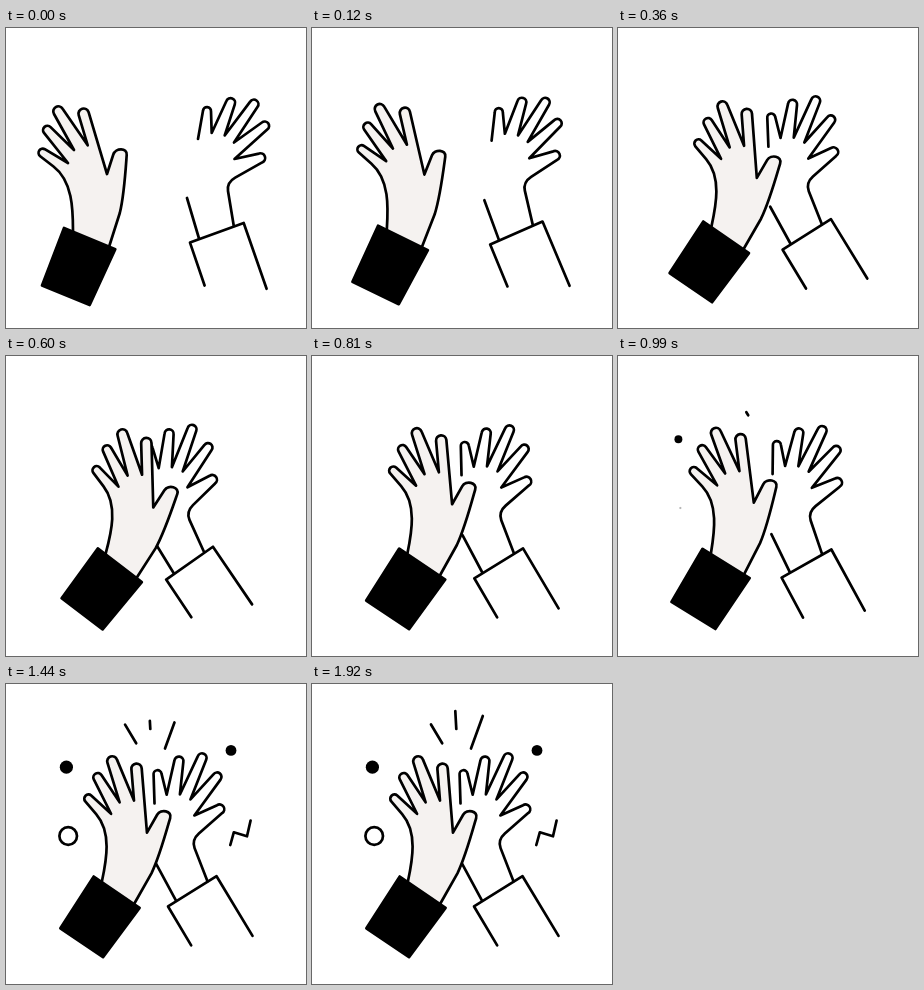
Animation, 300 px wide and 300 px high, one loop 2730 ms. Source, as an HTML page:

```html
<!DOCTYPE html>
<html lang="en">
<head>
<meta charset="utf-8">
<title>High five</title>
<style>
  html, body { margin: 0; width: 100%; height: 100%; overflow: hidden; background: #fff; }
  svg { display: block; width: 100%; height: 100%; }
</style>
</head>
<body>
<svg viewBox="0 0 300 300" fill="none" stroke="#000" stroke-width="2.7" stroke-linecap="round" stroke-linejoin="round">
  <g id="right">
    <path d="M192 111 L197 82.8 A4 4 0 0 1 205 83.3 L205.7 105
      L220.4 73 A4.5 4.5 0 0 1 228.8 76.3 L218.7 107.5
      L244.2 73.6 A4.5 4.5 0 0 1 251.6 78.8 L228 114.5
      L255.9 94.5 A4.4 4.4 0 0 1 261.5 101.3 L228.5 131
      L252.9 125.6 A4.7 4.7 0 0 1 256.2 134.4 L229.2 149.6
      C223.2 153 221.2 157.5 222 163 L227.8 198"/>
    <path d="M181 170 L193 210.5"/>
    <path d="M198.6 257.5 L184 214.6 L237.7 195 L260.6 260.8"/>
  </g>
  <g id="left">
    <path fill="#f5f2f0" d="M67 203 C67 181 66.5 153 47.5 138.5 L34.2 128.2
      A4.2 4.2 0 0 1 38.8 121.2 L62 135
      L38 104.9 A4.4 4.4 0 0 1 44.6 99.1 L68 122
      L48 86 A5 5 0 0 1 56.6 80.8 L81.7 117.3
      L72.7 87.2 A5.1 5.1 0 0 1 82.6 84.2 L101 146
      L107.3 126.5 C109.5 119.5 121.5 119.5 120.7 127
      C119 151 118 168 113.8 185 L103.3 218"/>
    <path fill="#000" d="M58 200 L109.3 221.2 L83.7 277 L36 257.5Z"/>
  </g>
  <circle id="dotLeft" cx="60.4" cy="83.2" fill="#000" stroke="none"/>
  <circle id="dotRight" cx="225" cy="66.4" fill="#000" stroke="none"/>
  <circle id="ring" cx="62.2" cy="152"/>
  <path id="rayLeft" pathLength="1" d="M130.2 59.3 L119 40.5"/>
  <path id="rayMiddle" pathLength="1" d="M144.3 45 L143.3 27"/>
  <path id="rayRight" pathLength="1" d="M159 64.5 L170.8 32"/>
  <path id="zigzag" pathLength="1" d="M224.3 161 L227.8 148.3 L241 152.3 L244.6 136.5"/>
</svg>
<script>
  const LOOP = 2730, STEP = 30;
  const el = id => document.getElementById(id);
  const clamp = u => Math.min(1, Math.max(0, u));
  const span = (t, start, length) => clamp((t - start) / length);
  const smooth = u => u * u * (3 - 2 * u);
  const easeOut = u => 1 - (1 - u) ** 3;
  // Already moving at the start, at rest at the end.
  const arrive = (u, slope = 0.83) => slope * u + (3 - 2 * slope) * u * u + (slope - 2) * u ** 3;

  function place(id, angle, px, py, dx, dy) {
    el(id).setAttribute("transform", `translate(${dx} ${dy}) rotate(${angle} ${px} ${py})`);
  }

  function grow(id, radius, t, start, line = 0) {
    const k = easeOut(span(t, start, 400));
    el(id).setAttribute("r", radius * k);
    if (line) el(id).setAttribute("stroke-width", line * k);
  }

  function trace(id, t, start, length) {
    const k = easeOut(span(t, start, length));
    el(id).setAttribute("stroke-dasharray", k < 1 ? `${k} 2` : "none");
    el(id).setAttribute("visibility", k > 0 ? "visible" : "hidden");
  }

  function draw(t) {
    const move = arrive(span(t, 0, 540));
    const angle = 15.3 * move - 5.9 * smooth(span(t, 540, 450)) + 2.5 * smooth(span(t, 990, 390));
    place("left", angle, 77.3, 271, 14.7 * move, -5 * move);
    place("right", -angle, 196.2, 253.5, -14.2 * move, 4.5 * move);

    grow("dotLeft", 6.6, t, 885);
    grow("dotRight", 5.4, t, 1010);
    grow("ring", 8.8, t, 979, 2.7);
    trace("rayLeft", t, 955, 600);
    trace("rayRight", t, 1190, 600);
    trace("rayMiddle", t, 1330, 600);
    trace("zigzag", t, 1030, 400);
  }

  const begin = performance.now();
  function tick() {
    const t = (performance.now() - begin) % LOOP;
    draw(Math.floor(t / STEP) * STEP);
    requestAnimationFrame(tick);
  }
  draw(0);
  requestAnimationFrame(tick);
</script>
</body>
</html>
```
